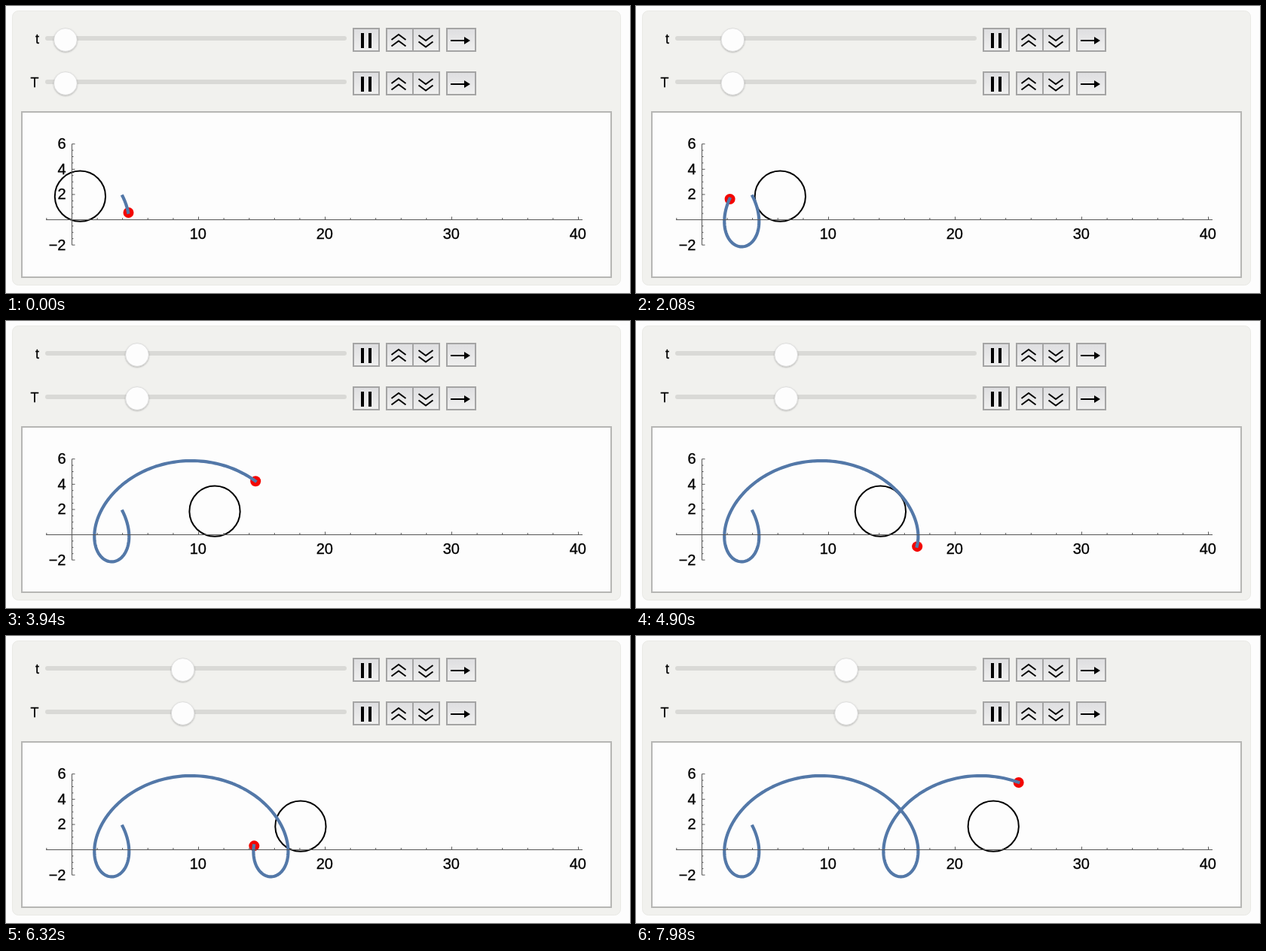
Write an HTML page that moves like this. It is 828x382 px and loops after 8000 ms.

```html
<!DOCTYPE html>
<html lang="en">
<head>
<meta charset="utf-8">
<title>Rolling circle</title>
<style>
  html, body { margin: 0; width: 100%; height: 100%; overflow: hidden; background: #fdfdfd; }
  svg { display: block; width: 828px; height: 382px; }
  text { font-family: "Liberation Sans", Arial, sans-serif; stroke: #000; stroke-width: .3; }
  .name { font-size: 18px; text-anchor: end; }
  .tick { font-size: 20px; }
  .button { fill: url(#buttonFill); stroke: #a4a4a4; stroke-width: 2; }
  .icon { fill: none; stroke: #000; stroke-width: 2; }
  .thumb { fill: #fdfdfd; stroke: #d0d0d0; stroke-width: .6; filter: url(#shadow); }
</style>
</head>
<body>
<svg viewBox="0 0 828 382">
  <defs>
    <linearGradient id="buttonFill" x2="0" y2="1">
      <stop stop-color="#dedee0"/>
      <stop offset="1" stop-color="#f0f0ef"/>
    </linearGradient>
    <filter id="shadow" x="-30%" y="-30%" width="160%" height="160%">
      <feDropShadow dx="0" dy="1" stdDeviation="1.2" flood-color="#000" flood-opacity=".3"/>
    </filter>
    <g id="control">
      <rect x="52" y="40" width="400" height="6" rx="3" fill="#d9d9d6"/>
      <rect class="button" x="461" y="30" width="34" height="30"/>
      <rect class="button" x="505" y="30" width="35" height="30"/>
      <rect class="button" x="540" y="30" width="35" height="30"/>
      <rect class="button" x="585" y="30" width="38" height="30"/>
      <path d="M471 36h4v20h-4zM481 36h4v20h-4z"/>
      <path class="icon" d="M511.5 45l9.5-7 9.5 7M511.5 53.5l9.5-7 9.5 7M547.5 39l9.5 7 9.5-7M547.5 47.5l9.5 7 9.5-7M590 46h20"/>
      <path d="M608 41l8 5-8 5z"/>
    </g>
  </defs>
  <rect x="8.5" y="6.5" width="807" height="365" rx="8" fill="#f1f1ee" stroke="#e9e9e5"/>
  <use href="#control"/>
  <use href="#control" y="58"/>
  <text class="name" x="44" y="49.5">t</text>
  <text class="name" x="43.5" y="108">T</text>
  <circle class="thumb" cy="45" r="15.3"/>
  <circle class="thumb" cy="103" r="15.3"/>
  <rect x="21" y="141" width="782" height="220" fill="#fdfdfd" stroke="#b6b6b4" stroke-width="2"/>
  <circle id="wheel" fill="none" stroke="#000" stroke-width="2"/>
  <circle id="pen" r="7" fill="#f30500"/>
  <path id="trail" fill="none" stroke="#5378a8" stroke-width="4.2" stroke-linejoin="round" stroke-linecap="square"/>
  <path id="axes" fill="none" stroke="#555"/>
  <g id="labels"></g>
</svg>
<script>
const UNIT = 16.8, LEFT = 87.5, AXIS_Y = 284.5, GROUND = 286.8;
const RADIUS = 2, ARM = 4, LOOP = 8000;
const $ = id => document.getElementById(id);
const setAttrs = (el, attrs) => {
  for (const key in attrs) el.setAttribute(key, attrs[key]);
};
const px = x => LEFT + x * UNIT;
const py = y => GROUND - y * UNIT;

function drawAxes() {
  const tickY = y => AXIS_Y - y * UNIT;
  let d = `M53 ${AXIS_Y}H765M${LEFT} ${tickY(6)}V${tickY(-2)}`;
  for (let x = -2; x <= 40; x += 2) d += `M${px(x)} ${AXIS_Y}v${x % 10 ? -2.5 : -4}`;
  for (let y = -2; y <= 6; y += .5) d += `M${LEFT} ${tickY(y)}h${y % 2 ? 2 : 4}`;
  $("axes").setAttribute("d", d);

  const label = (text, x, y, anchor) =>
    `<text class="tick" x="${x}" y="${y}" text-anchor="${anchor}">${text}</text>`;
  $("labels").innerHTML =
    [10, 20, 30, 40].map(x => label(x, px(x) - .7, 310, "middle")).join("") +
    [6, 4, 2, -2].map(y => label(String(y).replace("-", "\u2212"), 79.5, tickY(y) + 6.5, "end")).join("");
}

// The pen sits on an arm longer than the wheel's radius.
const penAt = a => [px(RADIUS * a + ARM * Math.cos(a)), py(RADIUS - ARM * Math.sin(a))];

// Steps come in uneven triples: 20, 100 and 20 ms.
function stepAt(ms) {
  const rest = ms % 140;
  return 3 * Math.floor(ms / 140) + (rest >= 20) + (rest >= 120);
}

// [step, angle]: the speed of rolling varies slightly.
const pace = [[0, .325], [29, 2.247], [60, 3.99], [85, 5.64], [105, 7.05], [136, 9.03], [171, 11.51]];

function angleAt(step) {
  const i = Math.max(1, pace.findIndex(([s]) => s >= step));
  const [s0, a0] = pace[i - 1], [s1, a1] = pace[i];
  return a0 + (a1 - a0) * (step - s0) / (s1 - s0);
}

function draw(ms) {
  const angle = angleAt(stepAt(ms));
  const [x, y] = penAt(angle);
  for (const thumb of document.querySelectorAll(".thumb")) thumb.setAttribute("cx", 73.1 + 17.89 * angle);
  $("wheel").setAttribute("cx", px(RADIUS * angle));
  setAttrs($("pen"), { cx: x + .4, cy: y + .3 });

  const count = Math.ceil(angle / .04);
  const points = Array.from({ length: count + 1 }, (_, i) =>
    penAt(angle * i / count).map(v => v.toFixed(2)).join(" "));
  $("trail").setAttribute("d", "M" + points.join("L"));
}

drawAxes();
setAttrs($("wheel"), { cy: py(RADIUS), r: RADIUS * UNIT });
draw(0);
const start = performance.now();
requestAnimationFrame(function tick() {
  draw((performance.now() - start) % LOOP);
  requestAnimationFrame(tick);
});
</script>
</body>
</html>
```
